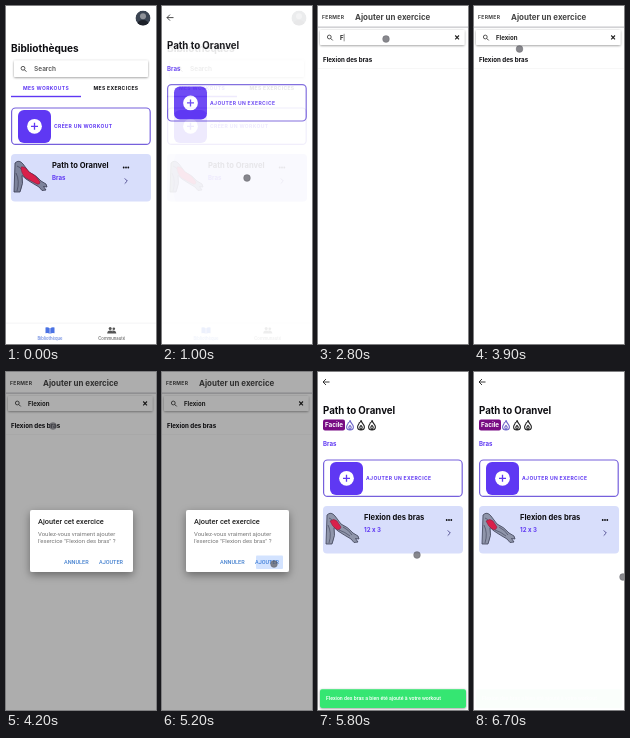
Animation of 150x338 px, one loop 6.8 s. Source, as an HTML page:

```html
<!DOCTYPE html>
<html lang="fr">
<head>
<meta charset="utf-8">
<title>Ajouter un exercice</title>
<style>
html, body { margin: 0; width: 100%; height: 100%; overflow: hidden; background: #fff; }
svg { display: block; width: 100%; height: 100%; }
text { font-family: Inter, sans-serif; font-weight: 700; }
.rb { font-family: Roboto, sans-serif; }
</style>
</head>
<body>
<svg id="stage" viewBox="0 0 150 338" preserveAspectRatio="none"></svg>
<script>
const LOOP = 6800, STEP = 100;
const VIOLET = '#5f38f3', INK = '#0c0c10', BLUE = '#4480cf';
const WORKOUT = 'Path to Oranvel', MOVE = 'Flexion des bras';

// y is the vertical middle of the capitals
const text = (x, y, size, str, fill = INK, attrs = '') =>
  `<text x="${x}" y="${y + size * 0.36}" font-size="${size}" fill="${fill}" ${attrs}>${str}</text>`;
const caps = (x, y, str, fill, attrs = '') => text(x, y, 5, str, fill, `letter-spacing=".36" ${attrs}`);
const rect = (x, y, w, h, r, fill, attrs = '') =>
  `<rect x="${x}" y="${y}" width="${w}" height="${h}" rx="${r}" fill="${fill}" ${attrs}/>`;
const line = (d, color, width = 1) =>
  `<path d="${d}" fill="none" stroke="${color}" stroke-width="${width}"/>`;
const group = (id, body, attrs = '') => `<g id="${id}" ${attrs}>${body}</g>`;
const at = (x, y, body) => `<g transform="translate(${x} ${y})">${body}</g>`;

const page = () => rect(0, 0, 150, 338, 0, '#fff');
const lens = (x, y) => `<circle cx="${x}" cy="${y}" r="1.9" fill="none" stroke="#444" stroke-width=".9"/>` +
  line(`M${x + 1.4} ${y + 1.4}l2 2`, '#444', 1);
const backArrow = line('M11.5 10H5M8 7L5 10l3 3', '#222', 0.9);

function addButton(y, label) {
  return rect(5.6, y, 138.6, 36.4, 4, '#fff', 'stroke="#7660dc" stroke-width="1.2"') +
    rect(12, y + 2, 33, 33, 6, VIOLET) +
    `<circle cx="28.5" cy="${y + 18.3}" r="7.4" fill="#fff"/>` +
    line(`M25 ${y + 18.3}h7M28.5 ${y + 14.8}v7`, VIOLET, 1.3) +
    caps(48, y + 18.3, label, VIOLET);
}

const ARM = 'M1 2Q5-2 9 3L15 11Q22 14 27 20L32 23 33 26 29.5 25.5 32 29 28 29.5 25 26Q18 22 12 18L8 14.5Q10 22 6 31L0 31Z';
const CREASES = 'M2 12q4 8 1 18M3 5q3 1 5 4M17 14q6 3 9 8M13 17q6 2 11 6';
const arm = (skin, ink, muscle) => `<path d="${ARM}" fill="${skin}" stroke="${ink}" stroke-width=".8"/>` +
  line(CREASES, ink, 0.6) + `<path d="${muscle}" fill="#d9204a" stroke="#7a1a3c" stroke-width=".5"/>`;
const armLong = arm('#7d839b', '#34364d', 'M7 6Q11 5 15 11Q22 14 26 21Q26 24 23 23Q17 20 12 17Q7 13 7 6Z');
const armShort = arm('#8f95aa', '#3d4056', 'M4 8Q8 5 11 8L15 14Q14 18 10 16Q6 13 4 8Z');

function card(y, art, title, sub, dotsX, chevX, dotsY, chevY) {
  const dots = [-2.3, 0, 2.3].map(d => `<circle cx="${dotsX + d}" cy="${dotsY}" r=".9" fill="${INK}"/>`).join('');
  return rect(5, y, 140, 47.5, 4, '#d8defb') + at(8, y + 7, art) +
    text(46, y + 11, 7.6, title) + text(46, y + 24, 6.1, sub, VIOLET) + dots +
    line(`M${chevX - 1.3} ${chevY - 2.6}l2.6 2.6l-2.6 2.6`, '#4a468c', 0.9);
}

const flame = (x, color) => at(x, 53,
  `<path d="M0-4.8C.5-1.6 3.4-.5 3.4 1.9A3.4 3 0 0 1-3.4 1.9C-3.4 0-2.1 0-1.8-2Q-.2-2.6 0-4.8Z
    M0 4.7Q-2.4 2.6 0 .4Q2.4 2.6 0 4.7" fill="none" stroke="${color}" stroke-width="1.1"/>`);

const library = page() +
  '<g clip-path="url(#face)"><circle cx="137" cy="12" r="7.6" fill="#3b4452"/>' +
  '<circle cx="137" cy="10.3" r="3" fill="#8f9299"/><ellipse cx="137" cy="19" rx="6" ry="5" fill="#1d2129"/></g>' +
  text(5, 42.8, 10.1, 'Bibliothèques') +
  rect(8, 54.5, 134, 16.5, 1, '#fff', 'filter="url(#soft)"') + lens(17, 62.3) +
  text(28, 62.8, 6.5, 'Search', '#555', 'style="font-weight:600"') +
  caps(40, 82.3, 'MES WORKOUTS', VIOLET, 'text-anchor="middle"') +
  caps(110, 82.3, 'MES EXERCICES', INK, 'text-anchor="middle"') +
  rect(5, 89.8, 70, 1.4, 0, VIOLET) +
  addButton(102, 'CRÉER UN WORKOUT') +
  card(148, armLong, WORKOUT, 'Bras', 120, 120, 161.5, 175) +
  rect(0, 316.8, 150, 0.5, 0, '#e8e8ea') +
  '<path d="M39.5 321.5q2.5-.6 4.2.7v5.5q-1.8-1-4.2-.5zM48.5 321.5q-2.5-.6-4.2.7v5.5q1.8-1 4.2-.5z" fill="#4a72e4"/>' +
  text(44, 332, 4.2, 'Bibliothèque', '#5c7ddd', 'text-anchor="middle" style="font-weight:500"') +
  '<path d="M101.2 327.5q0-3 3-3t3 3zM106.8 327.5q.3-2-.5-3q3.7-.5 4 3z" fill="#555"/>' +
  '<circle cx="104.2" cy="322.6" r="1.5" fill="#555"/><circle cx="107.8" cy="322.8" r="1.3" fill="#555"/>' +
  text(105.7, 332, 4.2, 'Communauté', '#666', 'text-anchor="middle" style="font-weight:500"');

const detail = page() + backArrow + text(5, 38.3, 9.7, WORKOUT) +
  group('level', rect(5, 47.6, 22, 10.8, 2, '#780b83') + text(7, 53, 6.3, 'Facile', '#fff') +
    flame(32, '#6f66c9') + flame(43, '#222') + flame(54, '#222')) +
  group('body', text(5, 61.3, 6.1, 'Bras', VIOLET) +
    addButton(77, 'AJOUTER UN EXERCICE') +
    '<g clip-path="url(#btn)"><circle id="btnWave" cx="73" cy="97" fill="#6d4cf0"/></g>') +
  group('added', card(134, armShort, MOVE, '12 x 3', 131, 131, 148, 161));

const picker = page() + caps(4, 11, 'FERMER', '#444') +
  text(37, 10.7, 7.95, 'Ajouter un exercice', '#444') +
  rect(0, 20.5, 150, 1.3, 0, '#c8c8cb') +
  rect(2, 24, 144.5, 15, 1, '#fff', 'filter="url(#soft)"') + lens(11.3, 31) +
  text(22, 31.5, 6.4, 'Rechercher un exercice', '#777', 'id="hint" style="font-weight:600"') +
  text(22, 31.5, 6.1, '', '#222', 'id="query"') +
  rect(22, 27.8, 0.6, 7.5, 0, '#444', 'id="caret"') +
  group('clear', line('M137.2 29.5l3.8 3.8M141 29.5l-3.8 3.8', '#222', 1.1)) +
  text(5, 53.5, 6.2, MOVE) + rect(0, 62.3, 150, 0.5, 0, '#eee') +
  group('other', text(5, 71.3, 6.1, 'Tractions'));

const roboto = 'class="rb" style="font-weight:';
const dialog = rect(24, 138, 103, 62, 2, '#fff', 'filter="url(#deep)"') +
  text(32, 149.3, 7.4, 'Ajouter cet exercice', '#222', roboto + '500"') +
  text(32, 162, 6, 'Voulez-vous vraiment ajouter', '#777', roboto + '400"') +
  text(32, 169.3, 6, 'l\'exercice "' + MOVE + '" ?', '#777', roboto + '400"') +
  text(58, 190, 5.5, 'ANNULER', BLUE, roboto + '500"') +
  text(93, 190, 5.5, 'AJOUTER', BLUE, roboto + '500"') +
  '<g clip-path="url(#ok)"><circle id="okWave" cx="112" cy="192" fill="#3880ff"/></g>';

const clip = (id, shape) => `<clipPath id="${id}">${shape}</clipPath>`;
const shadow = (id, dy, blur, alpha) => `<filter id="${id}" x="-30%" y="-50%" width="160%" height="200%">
  <feDropShadow dx="0" dy="${dy}" stdDeviation="${blur}" flood-color="#000" flood-opacity="${alpha}"/></filter>`;

const stage = document.getElementById('stage');
stage.innerHTML = '<defs>' + clip('face', '<circle cx="137" cy="12" r="7.6"/>') +
  clip('btn', rect(5.6, 77, 138.6, 36.4, 4, '#000')) + clip('card', rect(5, 148, 140, 47.5, 4, '#000')) +
  clip('ok', rect(94, 183.5, 27, 13.5, 1, '#000')) +
  shadow('soft', 0.7, 0.9, 0.42) + shadow('deep', 3, 4, 0.4) + '</defs>' +
  group('library', library + '<g clip-path="url(#card)"><circle id="cardWave" cx="85" cy="172" fill="#5b35f2"/></g>') +
  group('detail', detail) + rect(0, 0, 150, 338, 0, '#000', 'id="shade"') +
  group('picker', picker) + rect(0, 0, 150, 338, 0, '#000', 'id="dim"') + group('dialog', dialog) +
  group('toast', rect(2, 317.3, 146, 18.7, 2, '#36e672', 'filter="url(#soft)"') +
    text(8, 326.3, 5.2, MOVE + ' a bien été ajouté à votre workout', '#fff', roboto + '500"')) +
  '<circle id="pointer" r="3.4" fill="#55555c" fill-opacity=".7" stroke="#55555c" stroke-width=".5" stroke-opacity=".6"/>';

const el = {};
stage.querySelectorAll('[id]').forEach(n => el[n.id] = n);
const set = (id, name, value) => el[id].setAttribute(name, value);
const fade = (id, alpha) => { set(id, 'opacity', alpha); set(id, 'display', alpha > 0 ? 'inline' : 'none'); };

const span = (t, from, len) => Math.min(1, Math.max(0, (t - from) / len));
const out = x => 1 - (1 - x) ** 3;
const smooth = x => x * x * (3 - 2 * x);

// pointer path: time, x, y
const path = [[500, 140, 200], [700, 85, 172], [1100, 85, 172], [1400, 73, 97], [1800, 73, 97],
  [2200, 68, 33], [3300, 68, 33], [3600, 44, 32], [3800, 44, 32], [4000, 47, 54], [4200, 47, 54],
  [4500, 68, 133], [4900, 112, 192], [5300, 112, 192], [5800, 99, 183], [6100, 99, 183], [6700, 149, 205]];
const typing = [[2800, 'F'], [3000, 'Fl'], [3100, 'Fle'], [3200, 'Flexio'], [3400, 'Flexion']];

function pointerAt(t) {
  const i = path.findIndex(k => k[0] > t);
  if (i < 0) return path[path.length - 1].slice(1);
  if (i === 0) return path[0].slice(1);
  const [a, b] = [path[i - 1], path[i]];
  const p = smooth(span(t, a[0], b[0] - a[0]));
  return [a[1] + (b[1] - a[1]) * p, a[2] + (b[2] - a[2]) * p];
}

function rise(id, p) {
  fade(id, p);
  set(id, 'transform', `translate(0 ${16 * (1 - p)})`);
}

function wave(id, t, start, size, alpha, end) {
  set(id, 'r', size * out(span(t, start, 300)));
  fade(id, t > start ? alpha * (1 - span(t, end, 200)) : 0);
}

function draw(t) {
  rise('detail', out(span(t, 850, 280)));
  const done = t >= 5400;
  fade('level', +done);
  fade('added', +done);
  set('body', 'transform', `translate(0 ${done ? 11 : 0})`);

  const open = out(span(t, 1642, 280)) * (1 - out(span(t, 5420, 240)));
  rise('picker', open);
  fade('shade', 0.32 * open);

  const typed = typing.filter(k => k[0] <= t).pop();
  const query = typed ? typed[1] : '';
  el.query.textContent = query;
  fade('hint', +!query);
  fade('clear', +!!query);
  fade('other', +!query);
  fade('caret', +(t >= 2600 && t < 3700));
  set('caret', 'x', 22.2 + (query ? el.query.getComputedTextLength() : 0));

  const ask = smooth(span(t, 4040, 150)) * (1 - smooth(span(t, 5250, 150)));
  fade('dialog', ask);
  fade('dim', 0.32 * ask);
  const k = t < 5000 ? 0.9 + 0.1 * ask : 1;
  set('dialog', 'transform', `translate(75.5 169) scale(${k}) translate(-75.5 -169)`);

  wave('cardWave', t, 700, 75, 0.14, 1000);
  wave('btnWave', t, 1400, 53, 0.16, 1800);
  wave('okWave', t, 4900, 24, 0.22, 5300);
  fade('toast', span(t, 5500, 200) * (1 - 0.98 * span(t, 6450, 250)));

  const [x, y] = pointerAt(t);
  set('pointer', 'cx', x);
  set('pointer', 'cy', y);
  fade('pointer', +(t >= 500));
}

const start = performance.now();
function tick() {
  const t = (performance.now() - start) % LOOP;
  draw(Math.floor(t / STEP) * STEP);
  requestAnimationFrame(tick);
}
tick();
</script>
</body>
</html>
```
